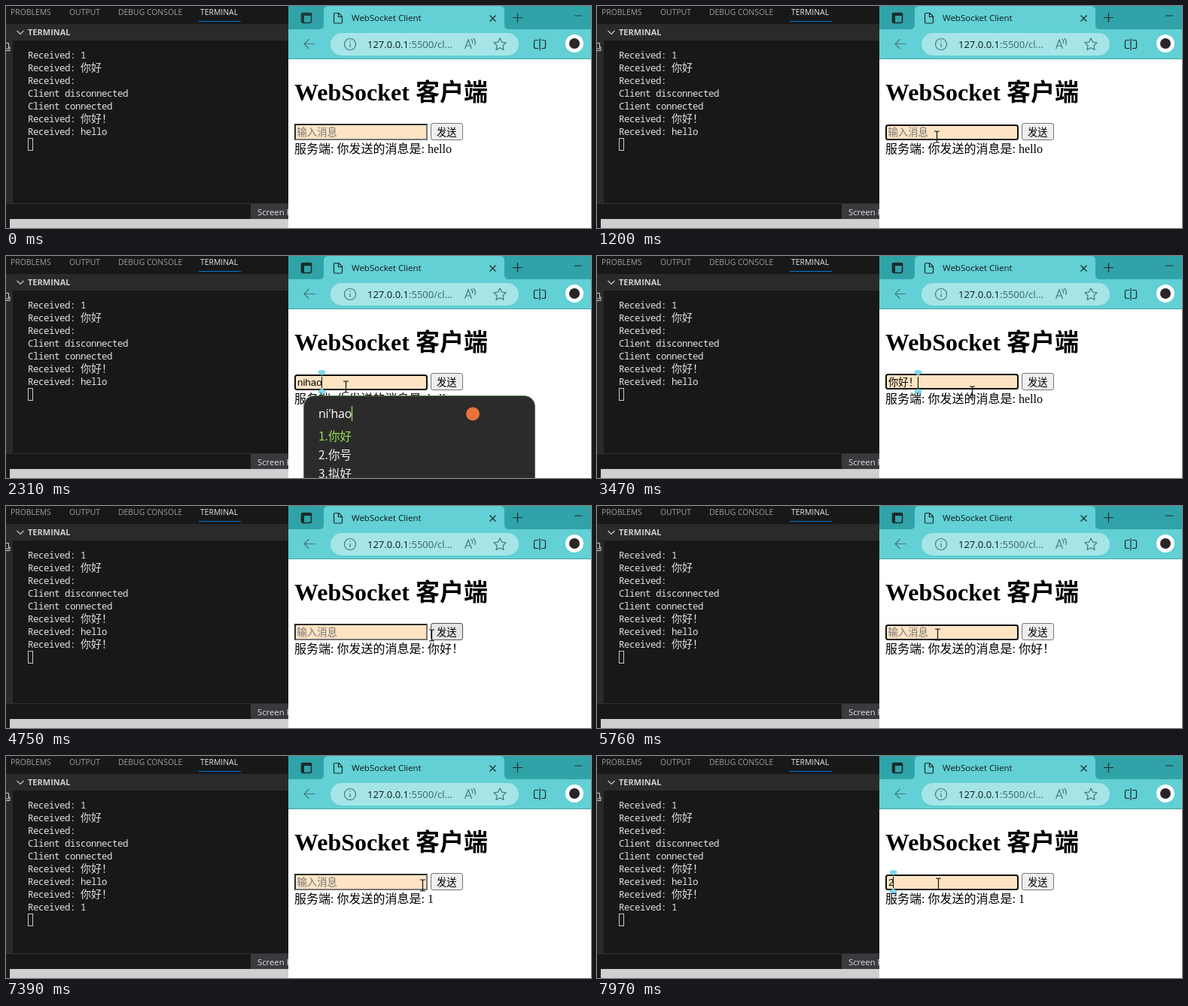
Write an HTML page that moves like this. It is 777 px wide and 296 px high and loops after 8 s.

```html
<!DOCTYPE html>
<html lang="zh-CN">
<head>
<meta charset="utf-8">
<title>WebSocket demo</title>
<style>
html, body { margin: 0; width: 100%; height: 100%; overflow: hidden; background: #fff; }
svg { display: block; }
text { white-space: pre; }
.ui { font-family: "Open Sans", "Noto Sans CJK SC", sans-serif; }
.tab { font-size: 10.4px; fill: #9d9d9d; }
.mono { font: 12.5px "Noto Sans Mono", "Noto Sans CJK SC", monospace; letter-spacing: -.5px; fill: #e2e2e2; }
.wide { font: 14px "Noto Sans CJK SC", sans-serif; letter-spacing: 0; }
.serif { font-family: "Liberation Serif", "Noto Sans CJK SC", serif; }
.form { font: 13.333px "Liberation Sans", "Noto Sans CJK SC", sans-serif; }
.cand { font: 15.5px "Noto Sans CJK SC", sans-serif; fill: #f2f2f2; }
.line { fill: none; stroke: #1b2b2c; stroke-width: 1.2; }
.soft { fill: none; stroke: #47787b; stroke-width: 1.2; }
</style>
</head>
<body>
<svg width="777" height="296" viewBox="0 0 777 296">
  <!-- Editor panel -->
  <rect width="375" height="296" fill="#181818"/>
  <g class="ui tab">
    <text x="6" y="12">PROBLEMS</text>
    <text x="84" y="12">OUTPUT</text>
    <text x="149" y="12">DEBUG CONSOLE</text>
    <text x="258" y="12" fill="#e7e7e7">TERMINAL</text>
  </g>
  <path d="M256 20.5H312" stroke="#0078d4"/>
  <path d="M0 24H375V46H9V263H0Z" fill="#2a2a2a"/>
  <path d="M14.5 33L19 37.5L23.5 33" fill="none" stroke="#ccc" stroke-width="1.1"/>
  <text class="ui" x="29" y="39" font-size="11" font-weight="700" fill="#d0d0d0">TERMINAL</text>
  <path d="M0 49.5H3.5V57H0M0 59.5H5V54" fill="none" stroke="#ccc"/>
  <g id="log" class="mono"></g>
  <rect id="block" x="29.5" width="6" height="16" fill="none" stroke="#ccc"/>
  <path d="M0 263.5H375" stroke="#2f2f2f"/>
  <rect x="325" y="264" width="50" height="20" fill="#383a3d"/>
  <text class="ui" x="334" y="279" font-size="11.3" fill="#e4e4e4">Screen R</text>
  <rect x="5" y="284" width="370" height="12" fill="#cfcfcf"/>

  <!-- Browser -->
  <rect x="375" width="402" height="296" fill="#fff"/>
  <rect x="375" width="402" height="32" fill="#30a3a8"/>
  <path d="M375 70V31H416Q422 31 422 25V6Q422 0 428 0H656Q662 0 662 6V25Q662 31 668 31H777V70Z" fill="#62d0d4"/>
  <path d="M375 70.5H777" stroke="#4aa3a6"/>
  <g id="chrome">
    <rect class="line" x="392.5" y="9.5" width="13" height="13" rx="2.5" style="stroke-width:1.6"/>
    <path d="M392 9h14v4h-14zM392 12h4v10h-4z" fill="#1b2b2c"/>
    <path class="line" d="M673 15.5H686M679.5 9V22M755 13H765"/>
  </g>
  <path class="line" d="M435.5 10.5Q435.5 9.5 437 9.5H442L446.5 14V21.5Q446.5 23 445 23H437Q435.5 23 435.5 21.5ZM441.5 9.5V14.5H446.5M642.5 12.5L650.5 20.5M650.5 12.5L642.5 20.5"/>
  <text class="ui" x="459" y="20" font-size="11.5" fill="#10191a">WebSocket Client</text>
  <path d="M410.5 50.5H396M402.5 44L396 50.5L402.5 57" class="soft"/>
  <rect x="431" y="36" width="250" height="30" rx="15" fill="#a6e5e7"/>
  <circle class="soft" cx="457" cy="51" r="7.5"/>
  <path class="soft" d="M457 50V55M457 46.5V48"/>
  <text class="ui" x="480" y="56" font-size="13" fill="#0c1718">127.0.0.1<tspan fill="#3a6466">:5500/cl...</tspan></text>
  <path class="soft" d="M609.5 57L614 45L618.5 57M611 53H617M617.5 44Q620.5 46.5 619.5 50M620.5 43Q625 47 622.5 52"/>
  <path id="star" class="soft" stroke-linejoin="round"/>
  <path class="line" d="M707 45.5H703.5Q701.5 45.5 701.5 47.5V54.5Q701.5 56.5 703.5 56.5H707M711 45.5H714.5Q716.5 45.5 716.5 47.5V54.5Q716.5 56.5 714.5 56.5H711M709 43V59"/>
  <circle cx="755" cy="50" r="12" fill="#fff"/>
  <circle cx="755" cy="50" r="7" fill="#2a2526"/>

  <!-- Page -->
  <text class="serif" x="383" y="126" font-size="32" font-weight="700">WebSocket 客户端</text>
  <g id="plain">
    <rect x="383" y="157" width="177" height="22" fill="#767676"/>
    <path d="M383 179V157H560L558 159H385V177Z" fill="#2c2c2c"/>
    <rect x="385" y="159" width="173" height="18" fill="#ffe4c4"/>
  </g>
  <rect id="ring" x="384" y="159" width="175" height="19" rx="2.5" fill="#ffe4c4" stroke="#101010" stroke-width="2"/>
  <text id="hint" class="form" x="386.5" y="173" fill="#757575">输入消息</text>
  <text id="value" class="form" x="387" y="173"></text>
  <path id="caret" d="M.5 161V176" stroke="#000"/>
  <g id="grips" fill="#7fd6ee">
    <path d="M-5 155Q-5 152 0 152Q5 152 5 155Q5 157 0 159Q-5 157 -5 155Z"/>
    <path d="M-5 181Q-5 184 0 184Q5 184 5 181Q5 179 0 177Q-5 179 -5 181Z"/>
  </g>
  <rect id="button" x="564.5" y="156.5" width="42" height="22" rx="2.5"/>
  <text class="form" x="572" y="173">发送</text>
  <text id="reply" class="serif" x="383" y="196" font-size="16"></text>

  <!-- Input method -->
  <g id="ime">
    <rect id="panel" x="395.5" y="186.5" height="140" rx="14" fill="#2b2b2b" stroke="#5c7a52"/>
    <text id="pinyin" class="ui" x="415" y="216" font-size="16" letter-spacing="-.3" fill="#fff"></text>
    <path id="imeCaret" d="M.5 200V220" stroke="#8be04e" stroke-width="1.3"/>
    <circle id="badge" cy="210.5" r="9" fill="#e8743b"/>
    <g id="cands" class="cand"></g>
  </g>

  <!-- Pointers -->
  <path id="beam" d="M-3.5 -7.5H-1L0 -6.5L1 -7.5H3.5M0 -6.5V6.5M-3.5 7.5H-1L0 6.5L1 7.5H3.5" fill="none" stroke="#111" stroke-width="1.2"/>
  <path id="arrow" d="M.5 .5V16L4 12.7L6.4 18.3L9 17.2L6.6 11.7H11.5Z" fill="#fff" stroke="#000"/>
</svg>
<script>
const LOOP = 8000, BLINK = 530, SEND = [4380, 7080], PRESS = [4290, 7000];
const WIDE = /[^ -~]+/g;
const $ = id => document.getElementById(id);
const show = (id, on) => $(id).style.display = on ? '' : 'none';
const move = (id, x, y = 0) => $(id).setAttribute('transform', `translate(${x} ${y})`);
const fillText = (id, s) => { if ($(id).textContent !== s) $(id).textContent = s; };

// time, value, focused, pinyin
const states = [
  [0, '', 0], [670, '', 1],
  [1790, 'n', 1, 'n'], [1980, 'ni', 1, 'ni'], [2060, 'nih', 1, "ni'h"],
  [2160, 'niha', 1, "ni'ha"], [2250, 'nihao', 1, "ni'hao"],
  [2370, '你好', 1], [3310, '你好！', 1], [4290, '你好！', 0], [4380, '', 0],
  [5230, '', 1], [5880, '1', 1], [7000, '1', 0], [7080, '', 0],
  [7780, '', 1], [7950, '2', 1]
];
const candidates = {
  n: '你那能', ni: '你呢泥', "ni'h": ['你好', '你会', '你还'],
  "ni'ha": ['你好', '你还', '你哈'], "ni'hao": ['你好', '你号', '拟好']
};
// time, x, y
const path = [
  [130, 342, 291], [350, 385, 232], [600, 450, 172], [920, 451, 174],
  [3310, 451, 174], [3470, 498, 181], [3680, 555, 179], [3900, 580, 175], [4040, 582, 172],
  [4690, 582, 172], [4750, 565, 172], [5000, 490, 172], [5200, 452, 171],
  [6290, 452, 171], [6410, 510, 173], [6530, 562, 174],
  [6640, 562, 174], [6700, 581, 172],
  [7270, 581, 172], [7450, 540, 172], [7720, 453, 170]
];
const log = ['Received: 1', 'Received: 你好', 'Received: ', 'Client disconnected',
  'Client connected', 'Received: 你好！', 'Received: hello', 'Received: 你好！', 'Received: 1'];

// Wide characters take two 7px cells.
$('log').innerHTML = log.map((s, i) => `<text x="29" y="${70 + 17 * i}">` +
  s.replace(WIDE, '<tspan class="wide">$&</tspan>') + '</text>').join('');
$('star').setAttribute('d', 'M' + [...Array(10).keys()].map(i => {
  const r = i % 2 ? 4.2 : 8.5, a = i * Math.PI / 5;
  return `${656 + r * Math.sin(a)} ${51.5 - r * Math.cos(a)}`;
}).join('L') + 'Z');

function pointerAt(t) {
  const i = path.findIndex(p => p[0] > t);
  if (i < 0) return path.at(-1).slice(1);
  const [t0, x0, y0] = path[i - 1], [t1, x1, y1] = path[i];
  const k = (t - t0) / (t1 - t0);
  return [x0 + (x1 - x0) * k, y0 + (y1 - y0) * k];
}

function drawIme(pinyin) {
  show('ime', pinyin);
  if (!pinyin) return;
  const right = pinyin.length > 2 ? 702 : 672;
  $('panel').setAttribute('width', right - 395);
  $('badge').setAttribute('cx', right - 82);
  fillText('pinyin', pinyin);
  move('imeCaret', Math.round(415 + $('pinyin').getComputedTextLength()));
  $('cands').innerHTML = [...candidates[pinyin]].map((c, i) =>
    `<text x="415" y="${246 + 25 * i}"${i ? '' : ' style="fill:#9be34f"'}>${i + 1}.${c}</text>`).join('');
}

function drawPointer(t) {
  const visible = t >= 130;
  const [x, y] = visible ? pointerAt(t) : [0, 0];
  const hover = x >= 564 && x <= 607 && y >= 156 && y <= 179;
  const inInput = x >= 383 && x < 566 && y >= 157 && y < 180;
  const onText = x >= 383 && x < 592 && y >= 180 && y < 199;
  const beam = inInput || onText;
  show('beam', visible && beam);
  show('arrow', visible && !beam);
  move('beam', Math.round(x) + .5, Math.round(y) + .5);
  move('arrow', Math.round(x), Math.round(y));
  const pressed = PRESS.some((p, i) => t >= p && t < SEND[i]);
  $('button').setAttribute('fill', pressed ? '#f5f5f5' : hover ? '#e5e5e5' : '#efefef');
  $('button').setAttribute('stroke', pressed ? '#8d8d8d' : hover ? '#4f4f4f' : '#767676');
}

function draw(t) {
  const [since, value, focused, pinyin] = states.findLast(s => s[0] <= t);
  const sent = SEND.filter(s => t >= s).length;

  [...$('log').children].forEach((line, i) => line.style.display = i < 7 + sent ? '' : 'none');
  $('block').setAttribute('y', 176.5 + 17 * sent);
  fillText('reply', '服务端: 你发送的消息是: ' + ['hello', '你好！', '1'][sent]);
  $('chrome').style.opacity = t < 670 ? .85 : 1;

  show('plain', !focused);
  show('ring', focused);
  // Taller wide glyphs lift the field by a pixel.
  const lift = value.search(WIDE) < 0 ? 0 : -1;
  move('ring', 0, lift);
  move('plain', 0, lift);
  show('hint', !value);
  fillText('value', value);
  const x = Math.round(387 + (value ? $('value').getComputedTextLength() : 0)) - (value ? 1 : 0);
  show('caret', focused && (t - since) % (2 * BLINK) < BLINK);
  move('caret', x);
  show('grips', focused && value);
  move('grips', x + .5);

  drawIme(pinyin);
  drawPointer(t);
}

const start = performance.now();
(function tick() {
  draw((performance.now() - start) % LOOP);
  requestAnimationFrame(tick);
})();
</script>
</body>
</html>
```
